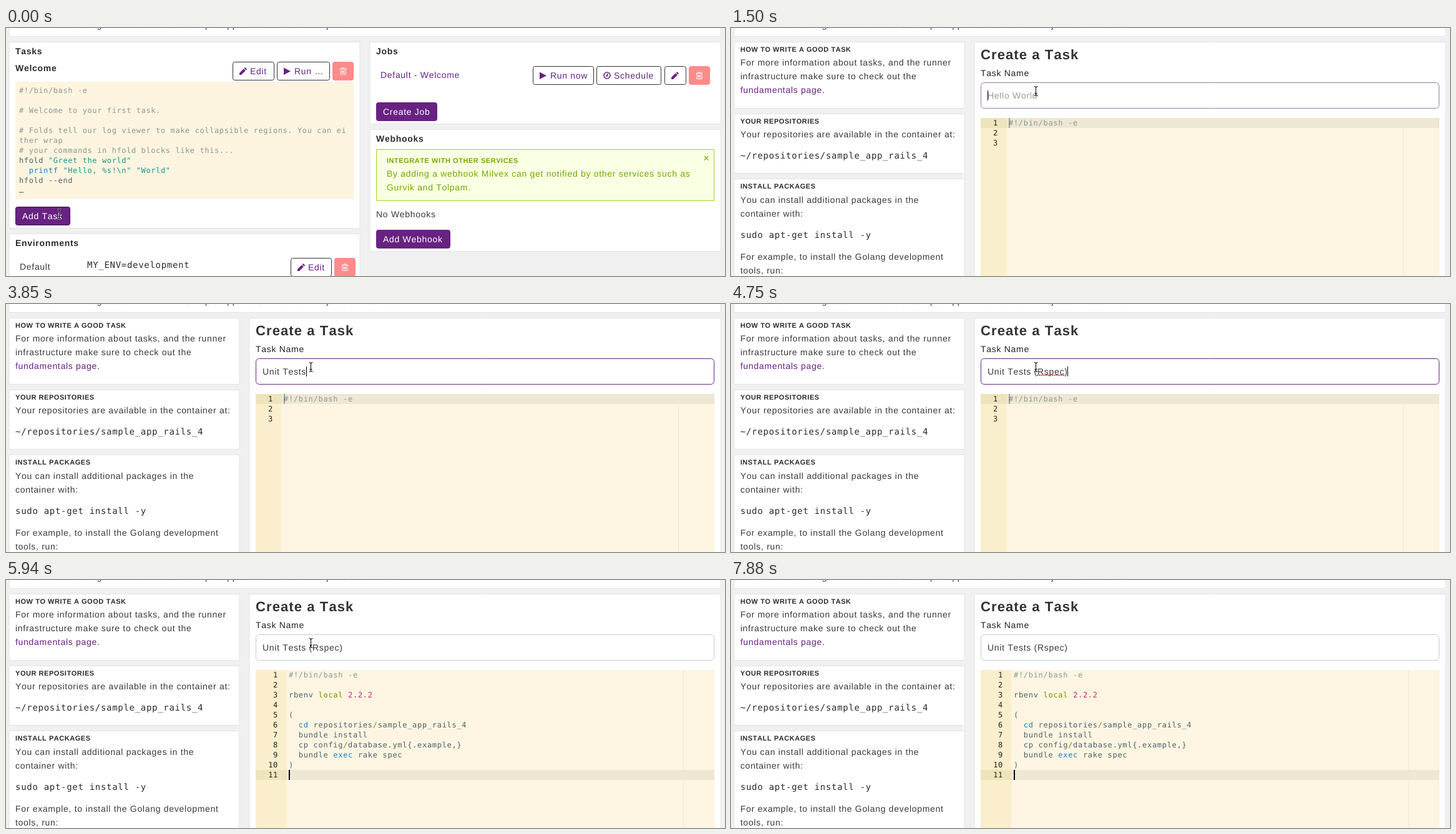
These frames come from a looping animation (1152x397 px, 8000 ms). An HTML page with a canvas:

```html
<!DOCTYPE html>
<html lang="en">
<head>
<meta charset="utf-8">
<title>Create a task</title>
<style>
  html, body { margin: 0; width: 100%; height: 100%; overflow: hidden; background: #f0f0f0; }
  canvas { display: block; }
</style>
</head>
<body>
<canvas id="stage" width="1152" height="397"></canvas>
<script>
const LOOP = 8000;
const ctx = document.getElementById('stage').getContext('2d');
const SANS = '"Liberation Sans", Arial, sans-serif';
const MONO = '"DejaVu Sans Mono", monospace';
const INK = '#3a3a3a', DARK = '#2b2b2b', PURPLE = '#682282', GREEN = '#74a800';
const BASE = '#4c626a', COMMENT = '#8a9999', STRING = '#0f9a8c', BLUE = '#1680cc',
      OLIVE = '#7a8f00', PINK = '#d02474';

ctx.fontKerning = 'none';
ctx.textRendering = 'geometricPrecision';

// ---------- drawing helpers ----------
function rect(x, y, w, h, color) {
  ctx.fillStyle = color;
  ctx.fillRect(x, y, w, h);
}

function box(x, y, w, h, fill, stroke, radius = 0) {
  ctx.beginPath();
  ctx.roundRect(x + .5, y + .5, w - 1, h - 1, radius);
  ctx.fillStyle = fill;
  ctx.fill();
  ctx.strokeStyle = stroke;
  ctx.lineWidth = 1;
  ctx.stroke();
}

function text(str, x, y, { size = 14, bold = false, mono = false, color = INK, spacing = size * .05 } = {}) {
  ctx.font = `${bold ? 'bold ' : ''}${size}px ${mono ? MONO : SANS}`;
  ctx.letterSpacing = spacing + 'px';
  ctx.fillStyle = color;
  ctx.fillText(str, x, y);
  return ctx.measureText(str).width;
}

const title = (str, x, y) => text(str, x, y, { bold: true, color: DARK });
const caps = (str, x, y, color = DARK) => text(str, x, y, { size: 11, bold: true, color });
const shell = (str, x, y) => text(str, x, y, { mono: true, color: DARK });
const lines = (list, x, y, style) => list.forEach((str, i) => text(str, x, y + i * 22, style));

// A line of code is a list of alternating strings and colours.
function code(runs, x, y, spacing) {
  for (let i = 0; i < runs.length; i += 2)
    x += text(runs[i], x, y, { size: 12, mono: true, color: runs[i + 1], spacing });
}

function panel(x, y, w, h) {
  box(x - .5, y, w + 1, h, '#fff', '#e3e3e3', 2);
}

// ---------- icons, each in a 12 px box ----------
const PENCIL = new Path2D('M0 12V9L6.8 2.2 9.8 5.2 3 12ZM7.6 1.4 8.6.4Q9.2-.1 9.8.4L11.6 2.2Q12.1 2.8 11.6 3.4L10.6 4.4Z');
const PLAY = new Path2D('M0 .5 11 6.2 0 12Z');
const CLOCK = new Path2D('M6 1A5 5 0 1 0 6 11A5 5 0 1 0 6 1M6.5 3V6.6H3.8');
const TRASH = new Path2D('M.8 2.5H11.2M4 2.5V.8H8V2.5M2 2.5V11.4H10V2.5M4.4 4.8V9.4M6 4.8V9.4M7.6 4.8V9.4');

function icon(path, x, y, color, lineWidth = 0) {
  ctx.save();
  ctx.translate(x, y);
  ctx.fillStyle = ctx.strokeStyle = color;
  ctx.lineWidth = lineWidth;
  lineWidth ? ctx.stroke(path) : ctx.fill(path);
  ctx.restore();
}

function outlineButton(x, y, w, path, label, lineWidth) {
  box(x, y, w, 30, '#fff', '#333', 3);
  icon(path, x + 11, y + 9, PURPLE, lineWidth);
  if (label) text(label, x + 28, y + 20, { color: PURPLE });
}

function deleteButton(x, y) {
  box(x, y, 34, 30, '#ff8b8b', '#ff8b8b', 3);
  icon(TRASH, x + 11, y + 9, '#fff', 1);
}

function solidButton(x, y, w, label, border = PURPLE) {
  box(x, y, w, 30, PURPLE, border, 3);
  text(label, x + 11, y + 20, { color: '#fff' });
}

// ---------- pages ----------
function breadcrumb(items) {
  panel(5, -30, 1140, 44);
  items.forEach(([label, x], i) => {
    if (i) text('/', x - 12, 0, { color: DARK });
    text(label, x, 0, { color: PURPLE });
  });
}
const CRUMBS = [['Home', 22], ['Knowledgebase Collection', 87], ['Sample App Rails 4', 288], ['Main Project', 452]];

const WELCOME = [
  ['#!/bin/bash -e', COMMENT], [],
  ['# Welcome to your first task.', COMMENT], [],
  ['# Folds tell our log viewer to make collapsible regions. You can ei', COMMENT],
  ['ther wrap', COMMENT],
  ['# your commands in hfold blocks like this...', COMMENT],
  ['hfold ', BASE, '"Greet the world"', STRING],
  ['  printf ', BLUE, '"Hello, %s!\\n" "World"', STRING],
  ['hfold --end', BASE],
  ['…', BASE]
];

function projectPage() {
  breadcrumb(CRUMBS);

  panel(5, 22, 562, 299);
  title('Tasks', 15, 42);
  title('Welcome', 15, 69);
  outlineButton(363, 54, 67, PENCIL, 'Edit');
  outlineButton(434, 54, 85, PLAY, 'Run …');
  deleteButton(523, 54);
  rect(15, 86, 542, 188, '#fdf4df');
  WELCOME.forEach((runs, i) => code(runs, 21, 104 + i * 16, .6));
  solidButton(15, 286, 88, 'Add Task', '#3c1050');

  panel(5, 329, 562, 100);
  title('Environments', 15, 349);
  text('Default', 22, 387);
  shell('MY_ENV=development', 130, 384);
  outlineButton(456, 368, 66, PENCIL, 'Edit');
  deleteButton(526, 368);

  panel(583, 22, 562, 132);
  title('Jobs', 593, 42);
  text('Default - Welcome', 600, 80, { color: PURPLE });
  outlineButton(844, 61, 98, PLAY, 'Run now');
  outlineButton(946, 61, 104, CLOCK, 'Schedule', 1.6);
  outlineButton(1055, 61, 35, PENCIL);
  deleteButton(1094, 61);
  solidButton(593, 119, 98, 'Create Job');

  panel(583, 162, 562, 196);
  title('Webhooks', 593, 182);
  box(593, 194, 542, 83, '#f8ffe2', '#a0d911');
  caps('INTEGRATE WITH OTHER SERVICES', 610, 216, GREEN);
  lines(['By adding a webhook Milvex can get notified by other services such as',
         'Gurvik and Tolpam.'], 610, 238, { color: GREEN });
  text('×', 1117, 214, { size: 17, color: GREEN });
  text('No Webhooks', 593, 303);
  solidButton(593, 323, 119, 'Add Webhook');
}

function helpColumn() {
  panel(5, 22, 369, 107);
  caps('HOW TO WRITE A GOOD TASK', 15, 38);
  lines(['For more information about tasks, and the runner',
         'infrastructure make sure to check out the'], 15, 60);
  const end = 15 + text('fundamentals page', 15, 104, { color: PURPLE });
  text('.', end, 104);

  panel(5, 137, 369, 96);
  caps('YOUR REPOSITORIES', 15, 153);
  text('Your repositories are available in the container at:', 15, 175);
  shell('~/repositories/sample_app_rails_4', 15, 209);

  panel(5, 241, 369, 200);
  caps('INSTALL PACKAGES', 15, 257);
  lines(['You can install additional packages in the', 'container with:'], 15, 280);
  shell('sudo apt-get install -y', 15, 336);
  lines(['For example, to install the Golang development', 'tools, run:'], 15, 371);
}

// ---------- task name field ----------
const NAME = 'Unit Tests (Rspec)';
const TYPED = [[2680, 1], [2830, 2], [2980, 3], [3120, 4], [3270, 5], [3410, 7], [3560, 9], [3710, 10],
               [3860, 11], [4010, 12], [4150, 13], [4300, 14], [4450, 15], [4600, 17], [4750, 18]];

function nameField(t) {
  const focused = t >= 1500 && t < 5040;
  const fading = (t >= 1500 && t < 1640) || (t >= 5040 && t < 5190);
  box(400, 87, 735, 42, '#fff', fading ? '#9a77a7' : focused ? PURPLE : '#c9c9c9', 5);

  const count = TYPED.filter(([time]) => t >= time).length;
  const value = count ? NAME.slice(0, TYPED[count - 1][1]) : '';
  const width = value ? text(value, 411, 113) : 0;
  if (!value) text('Hello World', 411, 113, { color: '#999' });

  if (focused && value === NAME) {
    ctx.fillStyle = '#e0453f';
    for (let x = 490; x < 535; x += 3) ctx.fillRect(x, 113, 2, 2);
  }
  if (focused && !(t >= 2090 && t < 2530)) rect(Math.floor(411 + width), 100, 1, 16, '#000');
}

// ---------- code editor ----------
const SHORT = [['#!/bin/bash -e', COMMENT], [], []];
const SCRIPT = [
  ['#!/bin/bash -e', COMMENT], [],
  ['rbenv ', BASE, 'local ', OLIVE, '2.2.2', PINK], [],
  ['(', BASE],
  ['  cd ', BLUE, 'repositories', BASE, '/', OLIVE, 'sample_app_rails_4', BASE],
  ['  bundle install', BASE],
  ['  cp config', BASE, '/', OLIVE, 'database.yml{.example,}', BASE],
  ['  bundle ', BASE, 'exec', BLUE, ' rake spec', BASE],
  [')', BASE], []
];

function editor(t) {
  const pasted = t >= 5940, selected = t >= 5490 && !pasted;
  const rows = pasted ? SCRIPT : SHORT;
  const left = pasted ? 449 : 441;
  const activeY = 144 + 16 * (pasted ? 10 : selected ? 2 : 0);

  rect(400, 144, 735, 253, '#fdf5e1');
  rect(400, 144, left - 400, 253, '#faeecd');
  rect(left + 636, 144, 1, 253, '#f0e8d4');
  rect(400, activeY, left - 400, 16, '#ede4bb');
  if (selected) rect(left, 144, 1135 - left, 32, '#e4e4d2');
  else rect(left, activeY, 1135 - left, 16, '#ede7d3');

  rows.forEach((runs, i) => {
    const y = 156 + i * 16, label = String(i + 1);
    text(label, left - 13 - label.length * 7.924, y, { size: 12, mono: true, color: '#222', spacing: .7 });
    code(runs, left + 4, y, .7);
  });

  const blinkedOff = (t >= 6540 && t < 6990) || (t >= 7430 && t < 7880);
  if (!blinkedOff) rect(left + 4, activeY, 2, 16, t < 5040 ? 'rgba(60,75,80,.45)' : '#000');
}

// ---------- mouse ----------
const ARRIVAL = [[0, 85, 298], [450, 140, 268], [600, 370, 152], [750, 499, 94], [900, 488, 101]];

function mouse(t) {
  if (t >= 7130) return;
  let [, x, y] = ARRIVAL.filter(([time]) => t >= time).pop();
  if (t >= 6240) {
    const p = ((Math.floor((t - 6240) / 150) + 1) / 6) ** 2;
    x += 163 * p;
    y += 189 * p;
  }
  ctx.save();
  ctx.translate(Math.round(x) + .5, Math.round(y));
  ctx.beginPath();
  ctx.moveTo(-3, -7.5); ctx.quadraticCurveTo(0, -7.5, 0, -5);
  ctx.quadraticCurveTo(0, -7.5, 3, -7.5);
  ctx.moveTo(0, -5.5); ctx.lineTo(0, 5.5);
  ctx.moveTo(-3, 7.5); ctx.quadraticCurveTo(0, 7.5, 0, 5);
  ctx.quadraticCurveTo(0, 7.5, 3, 7.5);
  ctx.moveTo(-2, 3.5); ctx.lineTo(2, 3.5);
  ctx.strokeStyle = 'rgba(255,255,255,.5)';
  ctx.lineWidth = 2.4;
  ctx.stroke();
  ctx.strokeStyle = '#111';
  ctx.lineWidth = 1.1;
  ctx.stroke();
  ctx.restore();
}

function taskPage(t) {
  breadcrumb([...CRUMBS, ['Create Task', 554]]);
  helpColumn();
  panel(390, 22, 755, 420);
  text('Create a Task', 400, 50, { size: 22, bold: true, color: '#333' });
  text('Task Name', 400, 77, { color: '#222' });
  nameField(t);
  editor(t);
}

function frame(now) {
  const t = now % LOOP;
  rect(0, 0, 1152, 397, '#f0f0f0');
  if (t < 150) projectPage();
  else taskPage(t);
  mouse(t);
  requestAnimationFrame(frame);
}
requestAnimationFrame(frame);
</script>
</body>
</html>
```
